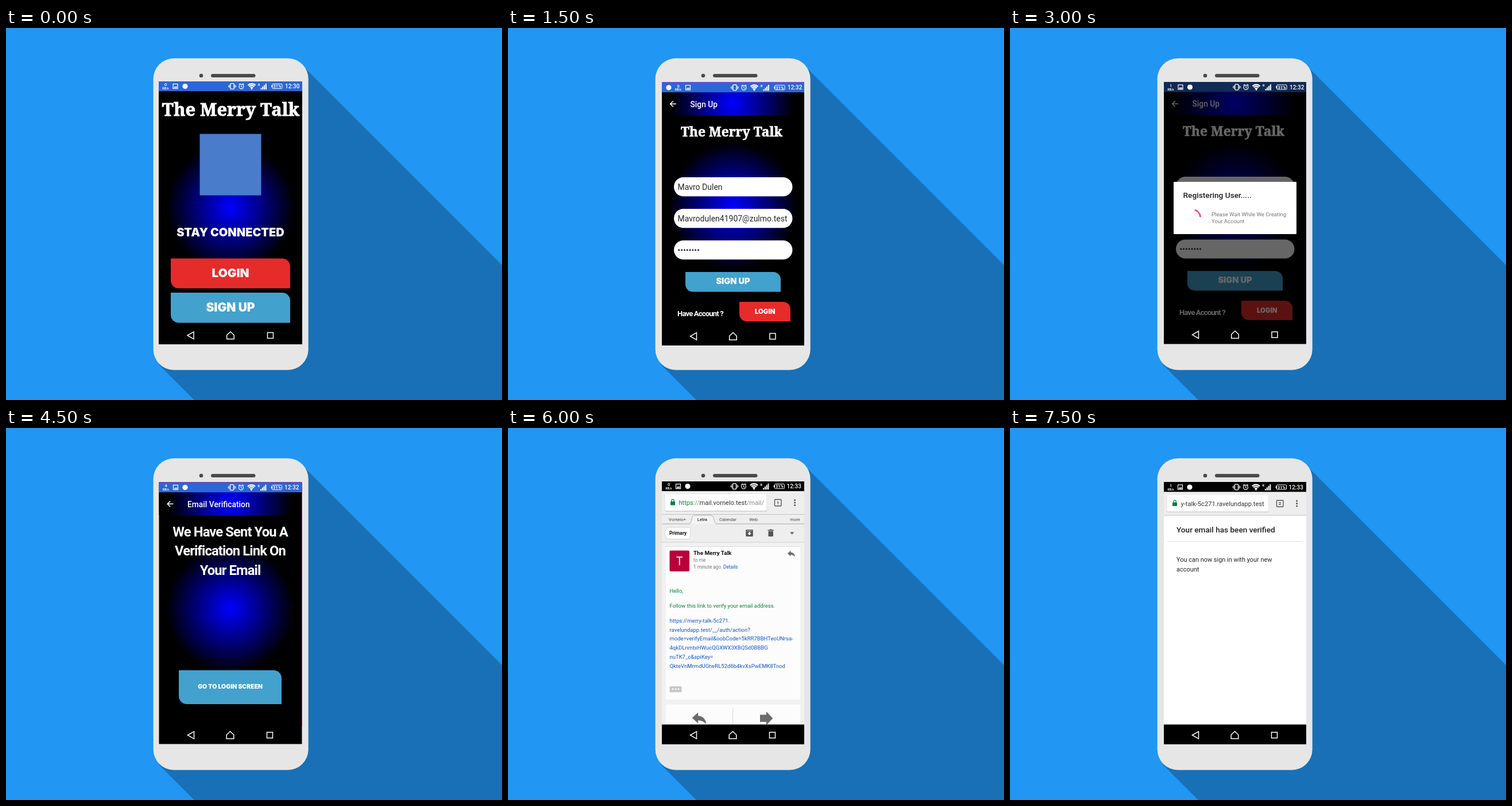
These frames come from a looping animation (864x648 px, 8000 ms). An HTML page:

```html
<!DOCTYPE html>
<html lang="en">
<head>
<meta charset="utf-8">
<title>Chat app walkthrough</title>
<style>
  html, body { margin: 0; width: 100%; height: 100%; overflow: hidden; background: #2196f3; }
  svg { display: block; width: 100vw; height: 100vh; }
  text { font-family: Roboto, sans-serif; white-space: pre; }
  .mid { text-anchor: middle; }
  .slab { font-family: "Noto Serif", serif; font-weight: 900; stroke: #fff; stroke-width: .03em; }
  .block { font-family: Inter, sans-serif; font-weight: 900; }
  .medium { font-weight: 500; }
  .bold { font-weight: 700; }
  .scene + .scene { opacity: 0; }
</style>
</head>
<body>
<svg id="stage" viewBox="0 0 864 648" xmlns="http://www.w3.org/2000/svg"></svg>
<script>
const APP = 'The Merry Talk';
const BLUE = '#43a1ce', RED = '#e62b2b', BAR = '#2b67d7';
const LOOP = 8000;

const rect = (x, y, x2, y2, fill, extra = '') =>
  `<rect x="${x}" y="${y}" width="${x2 - x}" height="${y2 - y}" fill="${fill}" ${extra}/>`;
const circle = (x, y, r, fill) => `<circle cx="${x}" cy="${y}" r="${r}" fill="${fill}"/>`;
const path = (d, fill, extra = '') => `<path d="${d}" fill="${fill}" ${extra}/>`;
const line = (d, stroke, width = 1) => path(d, 'none', `stroke="${stroke}" stroke-width="${width}"`);
const text = (x, y, size, str, fill = '#fff', cls = '', extra = '') =>
  `<text x="${x}" y="${y}" font-size="${size}" fill="${fill}" class="${cls}" ${extra}>${str}</text>`;
const move = (x, y, body) => `<g transform="translate(${x} ${y})">${body}</g>`;
const glow = (x, y) => circle(x, y, 112, 'url(#glow)');

// Button with two rounded corners: top right and bottom left
const button = (x, y, x2, y2, r, fill) => path(
  `M${x} ${y}H${x2 - r}A${r} ${r} 0 0 1 ${x2} ${y + r}V${y2}H${x + r}A${r} ${r} 0 0 1 ${x} ${y2 - r}Z`, fill);

const imageIcon = () =>
  rect(-4, -4, 4, 4, 'none', 'stroke="#fff" stroke-width="1.2"') + path('M-3 2.8L-1 0L.5 1.5L2 -.5L3 2.8Z', '#fff');

const speedIcon = n =>
  text(0, -.2, 7.5, n, '#fff', 'mid medium') + text(0, 5.5, 5, 'KB/s', '#fff', 'mid bold');

function deviceIcons(time, clockX) {
  const arcs = [3, 6, 9].map(r =>
    line(`M${34 - r * .72} ${5 - r * .74}A${r} ${r} 0 0 1 ${34 + r * .72} ${5 - r * .74}`, '#fff', 2.3)).join('');
  const bars = [0, 1, 2, 3].map(i => rect(49.5 + i * 2.8, 3 - i * 2.6, 51.5 + i * 2.8, 5.6, '#fff')).join('');
  return rect(-3, -4.8, 3, 4.8, 'none', 'rx="1" stroke="#fff" stroke-width="1.3"') +
    line('M-4.7 -3V3M4.7 -3V3M-6.3 -1.6V1.6M6.3 -1.6V1.6', '#fff') +
    `<circle cx="16" cy=".5" r="3.9" fill="none" stroke="#fff" stroke-width="1.2"/>` +
    line('M16 -1.8V.8L17.7 1.9M11.5 -2.8L14 -5M20.5 -2.8L18 -5', '#fff', 1.1) +
    arcs + circle(34, 4.4, 1.4, '#fff') +
    text(45, -1, 5.5, 'R', '#fff', 'bold') + bars +
    rect(70, -4, 87, 4, 'none', 'rx="1" stroke="#fff" stroke-width="1"') + rect(68.3, -1.7, 70, 1.7, '#fff') +
    text(78.5, 2.7, 7.4, '31%', '#fff', 'mid bold') +
    text(clockX, 3.6, 10, time, '#fff', 'medium');
}

const status = (y, [speedX, imageX, dotX], speed, x, time, clockX = 92) =>
  move(speedX, y, speedIcon(speed)) + move(imageX, y, imageIcon()) +
  circle(dotX, y, 4.6, '#fff') + move(x, y, deviceIcons(time, clockX));

const nav = (backX, homeX, squareX, y) =>
  `<g fill="none" stroke="#fff" stroke-width="1.5">
    <path d="M${backX - 5.5} ${y}l11 -6.3v12.6z"/>
    <path d="M${homeX - 6.3} ${y + 6.3}v-6.8l6.3 -6l6.3 6v6.8z"/>
    <rect x="${squareX - 5}" y="${y - 5}" width="10" height="10"/>
  </g>`;

const appBar = (x, x2, y, title, titleX) =>
  rect(x, y, x2, 152, 'url(#bar)') +
  line(`M${titleX - 24.5} 132.3h-10.3m5 -5l-5 5l5 5`, '#fff', 1.5) +
  text(titleX, 137.5, 13.8, title, '#fff', 'medium');

function welcome() {
  return rect(266, 93, 516, 551, '#000') + glow(391, 313) + rect(266, 93, 516, 110, BAR) +
    status(101.5, [278, 295, 312], 0, 394, '12:30') +
    text(391.5, 153, 30.8, APP, '#fff', 'slab mid') +
    rect(337.5, 184.5, 444.5, 291.5, '#4a7ccc') +
    text(391, 363, 20, 'STAY CONNECTED', '#fff', 'block mid') +
    button(287, 401.5, 495, 453.5, 14, RED) + text(391, 434, 20.8, 'LOGIN', '#fff', 'block mid') +
    button(287, 461, 495, 513.5, 14, BLUE) + text(391, 494, 21, 'SIGN UP', '#fff', 'block mid') +
    nav(321.5, 391, 460.5, 535.5);
}

function signUpForm() {
  const field = y => rect(289, y, 495.5, y + 33.3, '#fff', 'rx="16.6"');
  const dots = Array.from({ length: 8 }, (_, i) => circle(297.8 + i * 4.8, 386.7, 1.5, '#222')).join('');
  return rect(268, 94, 516, 553, '#000') + glow(392, 311) + appBar(268, 516, 112, 'Sign Up', 317.5) +
    text(389.5, 188.5, 22.8, APP, '#fff', 'slab mid') +
    field(260) + text(295.5, 282, 14, 'Mavro Dulen', '#2a2a2a') +
    field(315) + text(295.5, 337, 14, 'Mavrodulen41907@zulmo.test', '#2a2a2a') +
    field(370) + dots +
    button(309, 425, 475, 459.5, 13, BLUE) + text(392, 446, 14.6, 'SIGN UP', '#fff', 'block mid') +
    text(295, 502, 13, 'Have Account ?', '#fff', 'bold', 'letter-spacing="-.8"') +
    button(403, 477, 492, 511, 13, RED) + text(447.7, 498, 11.4, 'LOGIN', '#fff', 'block mid');
}

function signUp() {
  return signUpForm() + rect(268, 94, 516, 112, BAR) + line('M268 94.7H516', '#9b3bd0') +
    status(103.8, [296.5, 313.5, 280], 0, 395, '12:32') + nav(323, 392, 461, 537);
}

function registering() {
  return `<g transform="translate(0 .5) scale(1 .9945)">${signUpForm()}</g>` +
    rect(268, 94, 516, 550, '#000', 'opacity=".6"') + rect(268, 94, 516, 111.5, '#112a56') +
    status(103, [280, 297, 313.5], 1, 395, '12:32') +
    rect(285, 268, 499, 359, '#fff', 'rx="1"') +
    text(301.5, 295.8, 13.7, 'Registering User.....', '#212121', 'medium') +
    line('M321.7 316.8A14 14 0 0 1 331.6 329.3', '#ff4081', 2.7) +
    text(351, 327.8, 9.6, 'Please Wait While We Creating', '#757575') +
    text(351, 339.5, 9.6, 'Your Account', '#757575') + nav(323, 392, 461, 534.3);
}

function linkSent() {
  const lines = ['We Have Sent You A', 'Verification Link On', 'Your Email'];
  return rect(266.5, 94.5, 515.5, 550.5, '#000') + glow(390.5, 315) +
    appBar(266.5, 515.5, 112, 'Email Verification', 316) +
    rect(266.5, 94.5, 515.5, 112, BAR) + line('M266.5 95H515', '#8f2fa8') + line('M515.5 95V520', '#7d3a78') +
    status(103.5, [278.5, 295.5, 312], 4, 393.5, '12:32', 91.5) +
    lines.map((s, i) => text(390.5, 188.5 + i * 33.8, 23.8, s, '#fff', 'bold mid', 'letter-spacing="-.9"')).join('') +
    button(301, 422, 480, 481, 14, BLUE) +
    text(390.7, 454.3, 10.5, 'GO TO LOGIN SCREEN', '#fff', 'block mid') + nav(322, 390.5, 459.5, 535);
}

// Browser toolbar around the given vertical centre
const browserBar = (y, tabs, address) =>
  rect(268, y - 20, 516, y + 21, '#eee') +
  rect(273, y - 14, 451, y + 15.5, '#cfcfcf', 'rx="2"') + rect(273.5, y - 14.5, 450.5, y + 14, '#fff', 'rx="1.5"') +
  rect(283, y - 2, 291, y + 4.5, '#0b8043', 'rx="1"') +
  line(`M284.8 ${y - 2}v-1.4a2.2 2.2 0 0 1 4.4 0v1.4`, '#0b8043', 1.3) +
  text(297.5, y + 4.2, 11.1, address, '#333') +
  rect(464.5, y - 5.5, 476, y + 5.8, 'none', 'rx="1" stroke="#555" stroke-width="1.4"') +
  text(470.2, y + 2.8, 7.5, tabs, '#444', 'mid bold') +
  [-4.6, 0, 4.6].map(d => circle(499.6, y + d, 1.5, '#555')).join('');

const reply = path('M-6.5 -.5L-1 -5.5V-2.5Q5.5 -2 6.5 5Q3 1.7 -1 1.7V4.5Z', '#6b6b6b');

function mail() {
  const GREEN = '#0a8040', LINK = '#1155cc', GREY = '#777';
  const address = `<tspan fill="${GREEN}">https:</tspan><tspan fill="#888">//</tspan>mail.vornelo.test<tspan fill="#888">/mail/</tspan>`;
  const link = ['https://merry-talk-5c271.', 'ravelundapp.test/__/auth/action?',
    'mode=verifyEmail&amp;oobCode=5kRR7BBHTeoUNrsa-', '4qkDLnmtxHWucQGXWX3XBQSd0BBBG',
    'nuTK7_c&amp;apiKey=', 'QkteVnMrmdUGtwRL52d6b4kvXsPwEMK8Tnod'];
  const tab = (x, s, cls = '') => text(x, 161.6, 7.5, s, '#444', 'mid ' + cls);
  return rect(268, 93, 516, 551, '#f1f1f1') + rect(268, 93, 516, 110.5, '#000') +
    status(101.6, [280, 296.5, 313], 0, 394.5, '12:33', 91) +
    browserBar(130, 1, address) +
    rect(268, 150, 516, 199, '#eee') + line('M268 150.5H516', '#c2c2c2') +
    path('M268 167H316Q319 166 320 158Q321 152 326 152H353Q357 152 358.5 158Q360 166 363 167H516', '#f4f4f4',
      'stroke="#aaa" stroke-width="1"') +
    tab(295, 'Vornelo+') + tab(338.5, 'Letra', 'bold') + tab(383, 'Calendar') + tab(427.5, 'Web') + tab(500, 'more') +
    path('M276.5 173H315.5Q317.5 173 317.5 175V191.5Q317.5 193.5 315.5 193.5H276.5L272.5 183.2Z', '#fff',
      'stroke="#d2d2d2" stroke-width="1"') +
    text(296, 186.2, 8.5, 'Primary', '#111', 'mid bold') +
    rect(414.3, 177, 426.8, 189, '#555', 'rx="1.3"') +
    path('M419.3 181.3h2.6v2.2h2l-3.3 3.3l-3.3 -3.3h2z', '#fff') + line('M416 179h9', '#eee', .8) +
    rect(453.5, 179.5, 462, 189, '#555', 'rx="1"') + path('M452.5 177.2h3l1 -1h2.6l1 1h3v1.5h-10.6z', '#555') +
    path('M491 181.5h7.5l-3.75 3.8z', '#555') +
    line('M268 199H516', '#cfcfcf') + line('M275 206.5H509', '#dcdcdc') +
    rect(275, 207, 509, 473, '#fcfcfc') + rect(275, 481.5, 509, 516, '#fcfcfc') +
    rect(281.5, 213.5, 316, 249.7, '#b8003a', 'rx="2"') + text(298.7, 239, 20, 'T', '#fff', 'mid') +
    text(323, 221, 9.9, APP, '#111', 'bold') + text(323, 232.7, 8.3, 'to me', GREY) +
    text(323, 244.6, 8.3, '1 minute ago', GREY) + text(375, 244.6, 8.3, 'Details', LINK) +
    move(493.5, 219, reply) +
    text(281.5, 287.3, 9.5, 'Hello,', GREEN) +
    text(281.5, 313.3, 9.5, 'Follow this link to verify your email address.', GREEN) +
    link.map((s, i) => text(281.5, 338.8 + i * 15.75, 9.5, s, LINK)).join('') +
    rect(281.5, 450, 302.5, 460.3, '#c8c8c8', 'rx="1"') +
    [287, 292, 297].map(x => circle(x, 455, 1.4, '#fff')).join('') +
    line('M391.5 488V516', '#d8d8d8') +
    `<g transform="translate(333 506) scale(1.9)">${reply}</g>` +
    path('M439 499.5h11v-5.5l11.3 11.8l-11.3 11.8v-5.5h-11z', '#6b6b6b') +
    rect(268, 516.5, 516, 551, '#000') + nav(323, 391.5, 460.5, 535);
}

function verified() {
  return rect(268, 94, 516, 551, '#fff') + rect(268, 94, 516, 111.5, '#000') +
    status(103, [280, 296.5, 313], 1, 394.5, '12:33', 91) +
    browserBar(131.5, 2, 'y-talk-5c271.ravelundapp.test') + line('M268 152H516', '#c6c6c6') +
    text(290, 182, 13.6, 'Your email has been verified', '#212121', 'medium') +
    line('M274 197.5H509', '#dedede') +
    text(290, 232.7, 10.95, 'You can now sign in with your new', '#222') +
    text(290, 249.5, 10.95, 'account', '#222') +
    rect(268, 516.5, 516, 551, '#000') + nav(323, 391.5, 460.5, 535);
}

const backdrop = `<defs>
    <radialGradient id="glow"><stop stop-color="#00f"/><stop offset="1" stop-color="#000"/></radialGradient>
    <radialGradient id="bar" gradientUnits="userSpaceOnUse" cx="391" cy="132" r="108">
      <stop stop-color="#00f"/><stop offset="1" stop-color="#000"/></radialGradient>
  </defs>` +
  rect(0, 0, 864, 648, '#2196f3') +
  path('M515 64L864 413V648H328L266 586Z', '#1970b6') +
  rect(256.6, 52.8, 526.7, 595.8, '#e6e6e6', 'rx="36"') +
  circle(340, 83, 3.3, '#4a4a4a') + rect(357, 80, 434.5, 86, '#4a4a4a', 'rx="3"');

const scenes = [
  [0, welcome], [1500, signUp], [3000, registering],
  [4500, linkSent], [6000, mail], [7500, verified]
];

const stage = document.getElementById('stage');
stage.innerHTML = backdrop + scenes.map(([, draw]) => `<g class="scene">${draw()}</g>`).join('');

// One hard step per scene start; the closing step repeats the last scene
const times = [...scenes.map(([start]) => start), LOOP];
stage.querySelectorAll('.scene').forEach((scene, i) => {
  const steps = times.map((time, j) => ({
    offset: time / LOOP,
    opacity: Math.min(j, scenes.length - 1) === i ? 1 : 0,
    easing: 'steps(1, end)'
  }));
  scene.animate(steps, { duration: LOOP, iterations: Infinity });
});
</script>
</body>
</html>
```
